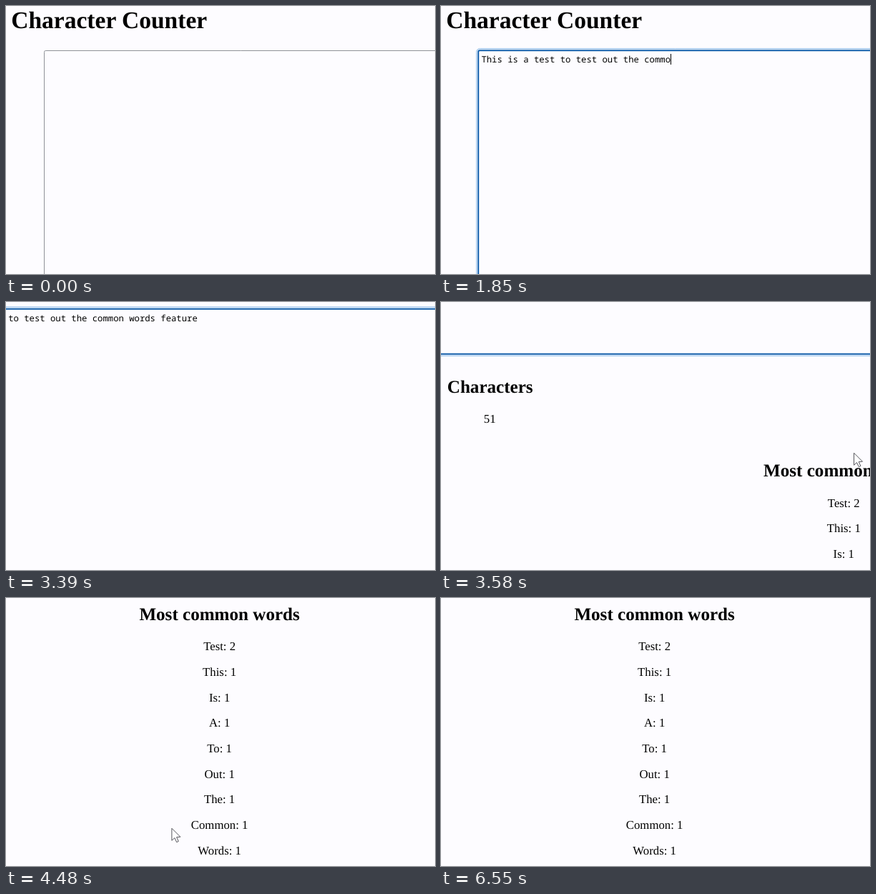
These frames come from a looping animation (600 by 375 pixels, 6.61 s). An HTML page with a canvas:

```html
<!DOCTYPE html>
<html lang="en">
<head>
<meta charset="utf-8">
<title>Character Counter</title>
<style>
  html, body { margin: 0; width: 100%; height: 100%; overflow: hidden; background: #fdfcff; }
  canvas { display: block; }
</style>
</head>
<body>
<canvas id="stage" width="600" height="375"></canvas>
<script>
const ctx = document.getElementById('stage').getContext('2d');
ctx.textRendering = 'geometricPrecision';

const LOOP = 6610;
const SERIF = '"Liberation Serif", "Times New Roman", serif';
const MONO = '12.25px "Noto Sans Mono", "DejaVu Sans Mono", monospace';
const PITCH = 7.35;
const MESSAGE = 'This is a test to test out the common words feature';
const COUNTS = ['Test: 2', 'This: 1', 'Is: 1', 'A: 1', 'To: 1', 'Out: 1',
  'The: 1', 'Common: 1', 'Words: 1', 'Feature: 1'];

// [time, characters typed]
const TYPING = [[150, 0], [1085, 24], [1355, 31], [2025, 39], [2400, 45], [2730, 45], [3050, 51]];
// [time, x, y] of the pointer tip on screen
const POINTER = [[3500, 690, 235], [3580, 578, 211], [3720, 425, 160], [3910, 355, 97],
  [4090, 440, 130], [4250, 490, 240], [4400, 340, 335], [4560, 130, 280],
  [4740, 15, 140], [4900, 60, 50], [5060, 167, 0], [5160, 215, -30]];
const ARROW = [[0, 0], [0, 17], [4, 13.4], [6.8, 19.4], [9.4, 18.2], [6.7, 12.4], [12, 12]];

const PAN = { x: 697, y: 639 };      // distance the view travels
const BOX = { left: 53.5, top: 62.5, right: 1939, bottom: 498 };

const progress = (t, from, to) => Math.min(1, Math.max(0, (t - from) / (to - from)));

function view(t) {
  const p = progress(t, 3166.6, 3880);
  const q = 1 - progress(t, 3370, 3870);
  return { x: PAN.x * p * p * (3 - 2 * p), y: PAN.y * (1 - q * q) };
}

function typed(t) {
  let count = 0, last = 0;
  for (let i = 1; i < TYPING.length; i++) {
    const [t0, n0] = TYPING[i - 1], [t1, n1] = TYPING[i];
    if (t < t0) break;
    count = Math.floor(n0 + (n1 - n0) * progress(t, t0, t1) + 1e-6);
    last = n1 > n0 ? t0 + (t1 - t0) * (count - n0) / (n1 - n0) : last;
  }
  return { count, caret: (t - last) % 500 < 250 };
}

function spline(a, b, c, d, u) {
  return b + u / 2 * (c - a + u * (2 * a - 5 * b + 4 * c - d + u * (3 * (b - c) + d - a)));
}

function pointerAt(t) {
  const last = POINTER.length - 1;
  if (t < POINTER[0][0] || t >= POINTER[last][0]) return null;
  let i = 0;
  while (t >= POINTER[i + 1][0]) i++;
  const pts = [Math.max(0, i - 1), i, i + 1, Math.min(last, i + 2)].map(k => POINTER[k]);
  const u = progress(t, pts[1][0], pts[2][0]);
  return [1, 2].map(axis => spline(...pts.map(p => p[axis]), u));
}

function write(text, x, y, font, align = 'center') {
  ctx.font = font;
  ctx.textAlign = align;
  ctx.fillStyle = '#000';
  ctx.fillText(text, x, y);
}

function frame(grow, width, color, radius, x) {
  ctx.strokeStyle = color;
  ctx.lineWidth = width;
  ctx.beginPath();
  ctx.roundRect(x - grow, BOX.top - grow, BOX.right - BOX.left + 2 * grow,
    BOX.bottom - BOX.top + 2 * grow, radius);
  ctx.stroke();
}

function drawEditor(t) {
  const shift = t >= 1230 ? 1 : 0;
  const x = BOX.left - shift;
  if (t < 120) {
    frame(0, 1, '#8f9297', 2, x);
    return;
  }
  frame(2, 3, '#e2eefb', 4, x);
  frame(3, 1, '#9dc4ec', 5, x);
  frame(0.3, 2, '#1560ac', 2, x);

  const { count, caret } = typed(t);
  const start = 57.4 - shift;
  write(MESSAGE.slice(0, count), start, 79.3, MONO, 'left');
  if (caret) ctx.fillRect(Math.round(start + count * PITCH), 67, 1, 15);
}

function drawResults() {
  const h2 = 'bold 25.1px ' + SERIF;
  const p = '16.75px ' + SERIF;
  write('Characters', 501, 552.5, h2);
  write('51', 500.5, 594.8, p);

  const mid = PAN.x + 298.6;
  write('Most common words', mid, PAN.y + 31, h2);
  COUNTS.forEach((line, i) => write(line, mid, PAN.y + 73.3 + i * 35.65, p));
}

function drawPointer(t) {
  const tip = pointerAt(t);
  if (!tip) return;
  ctx.beginPath();
  ARROW.forEach(([x, y]) => ctx.lineTo(tip[0] + x + 0.5, tip[1] + y + 0.5));
  ctx.closePath();
  ctx.fillStyle = '#fff';
  ctx.fill();
  ctx.strokeStyle = '#55555c';
  ctx.lineWidth = 1;
  ctx.stroke();
}

function draw(t) {
  ctx.fillStyle = '#fdfcff';
  ctx.fillRect(0, 0, 600, 375);
  const cam = view(t);
  ctx.save();
  ctx.translate(-cam.x, -cam.y);
  write('Character Counter', 7.3, 31, 'bold 33.5px ' + SERIF, 'left');
  drawEditor(t);
  drawResults();
  ctx.restore();
  drawPointer(t);
}

const begin = performance.now();
function tick() {
  draw((performance.now() - begin) % LOOP);
  requestAnimationFrame(tick);
}
tick();
</script>
</body>
</html>
```
